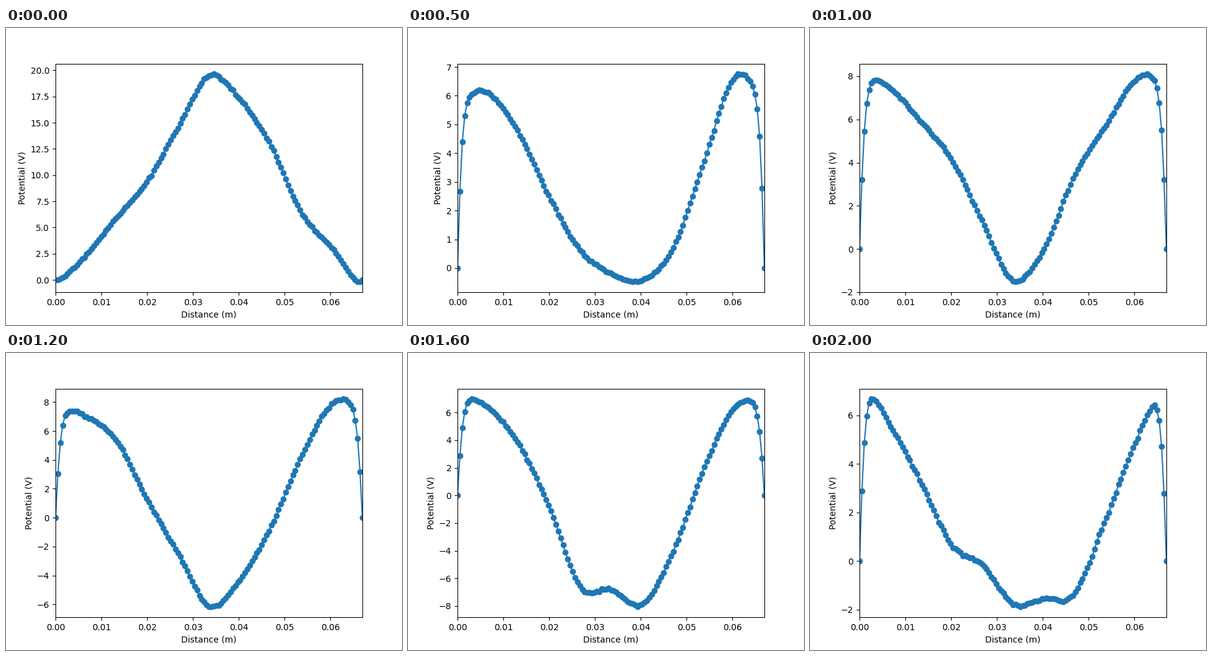
These frames come from a looping animation (640x480 px, 2100 ms). A matplotlib script:

```python
import numpy as np
import matplotlib.pyplot as plt
from matplotlib.animation import FuncAnimation

LENGTH = 0.067
CELLS = 128
FRAMES = 21

cell = np.arange(CELLS + 1)
x = LENGTH * cell / CELLS
wall = np.minimum(cell, CELLS - cell)


def smooth(t, knots, values):
    """Cubic Hermite curve that levels out at both ends."""
    values = np.asarray(values, float)
    slope = np.gradient(values, knots, axis=0)
    slope[0] = slope[-1] = 0
    i = np.clip(np.searchsorted(knots, t, side="right") - 1, 0, len(knots) - 2)
    h = np.take(knots, i + 1) - np.take(knots, i)
    u = (t - np.take(knots, i)) / h
    rise = u * u * (3 - 2 * u)
    return (values[i] * (1 - rise) + values[i + 1] * rise
            + h * u * (1 - u) * ((1 - u) * slope[i] - u * slope[i + 1]))


def shape(*levels):
    """Profile through a few evenly spaced levels, wall to wall."""
    return smooth(cell / CELLS, np.linspace(0, 1, len(levels)), levels)


# Slow envelope of the wave, by time step.
drift = {
    0: shape(0, 2.45, 6, 9.45, 14.6, 19.5, 17.25, 12.9, 6.5, 3.05, -.3),
    2: shape(3.4, 4.6, 7.85, 10.75, 15.25, 18, 17.3, 13.1, 8.6, 4.35, 3.6),
    8: shape(8.1, 7.65, 6.43, 7.2, 5.42, 4.3, 4.88, 7.63, 7, 7.42, 7.65),
    12: shape(7.75, 7, 5.3, 1.2, -2.5, -6.1, -4.3, -.7, 4.2, 7.85, 8.1),
    16: shape(7.35, 6.35, 3.7, -.9, -6.6, -6.8, -7.9, -4.2, 1.8, 6.3, 7),
    20: shape(7.4, 5.6, 3.25, .68, -.15, -1.75, -1.53, -1.33, 1.65, 4.92, 7.2),
}
bowl = shape(6, 6.1, 4.7, 2.47, .62, -.2, -.42, .65, 3.6, 6.62, 6.25)


def envelope(n):
    return smooth(n, list(drift), list(drift.values()))


swing = envelope(5) - bowl


def potential(n):
    """The wave flips over on every step and drops to zero at the walls."""
    y = envelope(n)
    if n % 2:
        y = y - swing * (2.4 * np.cos(np.radians(12 * n)) - 0.2)
    y = y + np.random.default_rng(n).normal(0, 0.0025 * np.ptp(y), y.size)
    rate = 0.49 + 0.52 * np.exp(-n / 3)
    return y * (1 - np.exp(-rate * wall ** 1.15))


fig, ax = plt.subplots(figsize=(6.4, 4.8), dpi=100)
line, = ax.plot(x, potential(0), "o-")
ax.set_xlim(0, LENGTH)
ax.set_xlabel("Distance (m)")
ax.set_ylabel("Potential (V)")


def update(n):
    line.set_ydata(potential(n))
    ax.relim()
    ax.autoscale_view(scalex=False)
    return line,


anim = FuncAnimation(fig, update, frames=FRAMES, interval=100,
                     repeat=True, repeat_delay=0, blit=False)
plt.show()
```
